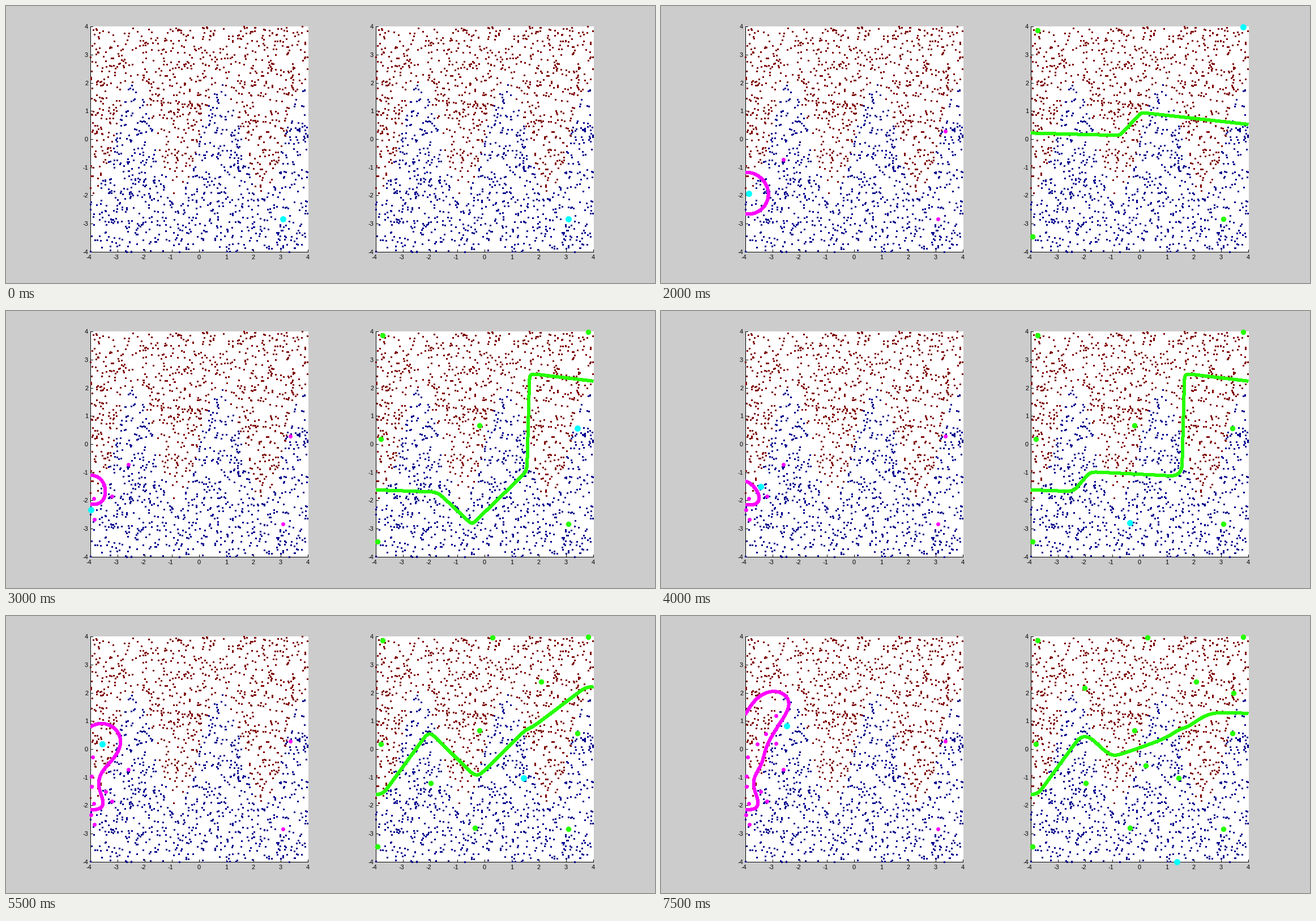
Recreate the animation shown at these times as a matplotlib script. Size 1146 by 489 pixels, loop 8000 ms.

```python
import numpy as np
import matplotlib.pyplot as plt
from matplotlib.animation import FuncAnimation
from matplotlib.patches import PathPatch, Rectangle
from matplotlib.path import Path

W, H, DPI = 1146, 489, 64
PT = 72 / DPI                      # points per pixel
LEFT, RIGHT = 149, 653             # left edge of each panel
TOP, BOTTOM = 36.5, 434.5
UX, UY = 48, (BOTTOM - TOP) / 8    # pixels per data unit
GAMMA = 2.0                        # exp(-GAMMA * d^2)
GREEN, MAGENTA, CYAN = "#26ff00", "#ff00ff", "#00ffff"
RED, BLUE = "#800000", "#00008f"

STEPS = 16
HOLDS, SKIPS = [1, 7, 12], [5, 11, 15]   # steps with no query, with two

# key points: the sample asked for at each query, in pixels
FIRST = (488, 375)
ASKED_L = np.array([
    FIRST, (501, 220), (215, 270), (154, 330), (186, 326), (155, 367),
    (149, 350), (175, 309), (150, 300), (150, 282), (152, 248), (169, 225),
    (202, 224), (184, 207), (202, 175), (221, 193)]) + 0.5
ASKED_R = np.array([
    (FIRST[0] + RIGHT - LEFT, FIRST[1]), (664, 42), (655, 406), (1027, 36),
    (835, 201), (661, 225), (1008, 206), (827, 373), (858, 37), (749, 294),
    (944, 115), (913, 285), (747, 126), (855, 263), (1010, 135),
    (910, 433)]) + 0.5


def queries(step):
    return (1 + step - sum(h <= step for h in HOLDS)
            + sum(s <= step for s in SKIPS))


def to_data(px, x0):
    return np.column_stack([(px[:, 0] - x0) / UX - 4,
                            (BOTTOM - px[:, 1]) / UY - 4])


def to_px(pts, x0):
    return np.column_stack([x0 + UX * (pts[:, 0] + 4),
                            BOTTOM - UY * (pts[:, 1] + 4)])


def label(pts):
    return np.where(pts[:, 1] > 2 * np.sin(2 * pts[:, 0]), 1, -1)


def sq_dist(a, b):
    return ((a[:, None] - b[None]) ** 2).sum(-1)


def svm(pts, y, grid):
    """Hard-margin RBF machine, trained on the most violating pair."""
    k = np.exp(-GAMMA * sq_dist(pts, pts))
    a, grad, b = np.zeros(len(y)), -np.ones(len(y)), 0
    for _ in range(4000):
        v = -y * grad
        i = np.argmax(np.where((y > 0) | (a > 0), v, -np.inf))
        j = np.argmin(np.where((y < 0) | (a > 0), v, np.inf))
        b = (v[i] + v[j]) / 2
        if v[i] - v[j] < 1e-4:
            break
        t = (v[i] - v[j]) / (k[i, i] + k[j, j] - 2 * k[i, j])
        if y[i] < 0:
            t = min(t, a[i])
        if y[j] > 0:
            t = min(t, a[j])
        a[i] += y[i] * t
        a[j] -= y[j] * t
        grad += y * (k[:, i] - k[:, j]) * t
    return np.exp(-GAMMA * sq_dist(grid, pts)) @ (a * y) + b


def kernel_vote(pts, y, grid):
    """Log odds of two equal-weight kernel sums."""
    e = -GAMMA * sq_dist(grid, pts)
    return (np.logaddexp.reduce(e[:, y > 0], axis=1)
            - np.logaddexp.reduce(e[:, y < 0], axis=1))


gx, gy = np.meshgrid(np.linspace(-4, 4, 193), np.linspace(-4, 4, 201))
GRID = np.column_stack([gx.ravel(), gy.ravel()])

fig = plt.figure(figsize=(W / DPI, H / DPI), dpi=DPI, facecolor="#cccccc")
ax = fig.add_axes([0, 0, 1, 1])
ax.set_xlim(0, W)
ax.set_ylim(H, 0)
ax.axis("off")


def box(x, y, w, h, color):
    r = Rectangle((x, y), w, h, fc=color, lw=0, aa=False, zorder=0.5)
    return ax.add_patch(r)


def squares(centres, color):
    corner = np.floor(centres) - 1
    shape = np.array([(0, 0), (3, 0), (3, 3), (0, 3), (0, 0)])
    verts = (corner[:, None] + shape).reshape(-1, 2)
    codes = [Path.MOVETO] + [Path.LINETO] * 3 + [Path.CLOSEPOLY]
    ax.add_patch(PathPatch(Path(verts, codes * len(corner)), fc=color,
                           lw=0, aa=False, snap=False, zorder=1))


def panel(x0, pts):
    frame = box(x0, 36, 385, 399, "white")
    box(x0, 36, 1, 399, "black")
    box(x0, 434, 385, 1, "black")
    font = dict(family="Liberation Sans", size=11 * PT, va="baseline")
    for n in range(-4, 5):
        x = x0 + UX * (n + 4)
        y = round(BOTTOM - 0.5 - UY * (n + 4))
        box(x, 430, 1, 4, "black")
        box(x0, y, 5, 1, "black")
        ax.text(x - (3 if n < 0 else 0), 447, str(n), ha="center", **font)
        ax.text(x0 - 4, y + 4, str(n), ha="right", **font)
    y = label(pts)
    squares(to_px(pts[y > 0], x0), RED)
    squares(to_px(pts[y < 0], x0), BLUE)
    return frame


def marks(color, size, z):
    return ax.scatter([], [], s=(size * PT) ** 2, c=color, lw=0,
                      antialiased=False, zorder=z)


pts_l, pts_r = to_data(ASKED_L, LEFT), to_data(ASKED_R, RIGHT)
cloud = np.random.RandomState(5489).uniform(-4, 4, (1620, 2))
cloud = np.clip(np.vstack([cloud, pts_l, pts_r]), -4, 4)

SIDES = [(LEFT, pts_l, svm, MAGENTA, panel(LEFT, cloud)),
         (RIGHT, pts_r, kernel_vote, GREEN, panel(RIGHT, cloud))]
old_l, old_r = marks(MAGENTA, 7, 3), marks(GREEN, 9.5, 3)
current = marks(CYAN, 11, 4)
curves = []


def draw(step):
    n = queries(step)
    while curves:
        curves.pop().remove()
    for x0, pts, model, color, frame in SIDES:
        p = pts[:n]
        y = label(p)
        if abs(y.sum()) == n:      # one class only, nothing to separate
            continue
        f = model(p, y, GRID).reshape(gx.shape)
        cs = ax.contour(x0 + UX * (gx + 4), BOTTOM - UY * (gy + 4), f,
                        levels=[0], colors=[color], linewidths=5 * PT,
                        antialiased=False, zorder=2)
        cs.set_clip_path(frame)
        curves.append(cs)
    old_l.set_offsets(ASKED_L[:n - 1])
    old_r.set_offsets(ASKED_R[:n - 1])
    current.set_offsets([ASKED_L[n - 1], ASKED_R[n - 1]])
    return [old_l, old_r, current]


anim = FuncAnimation(fig, draw, frames=STEPS, interval=500,
                     repeat=True, repeat_delay=0, blit=False)
plt.show()
```
